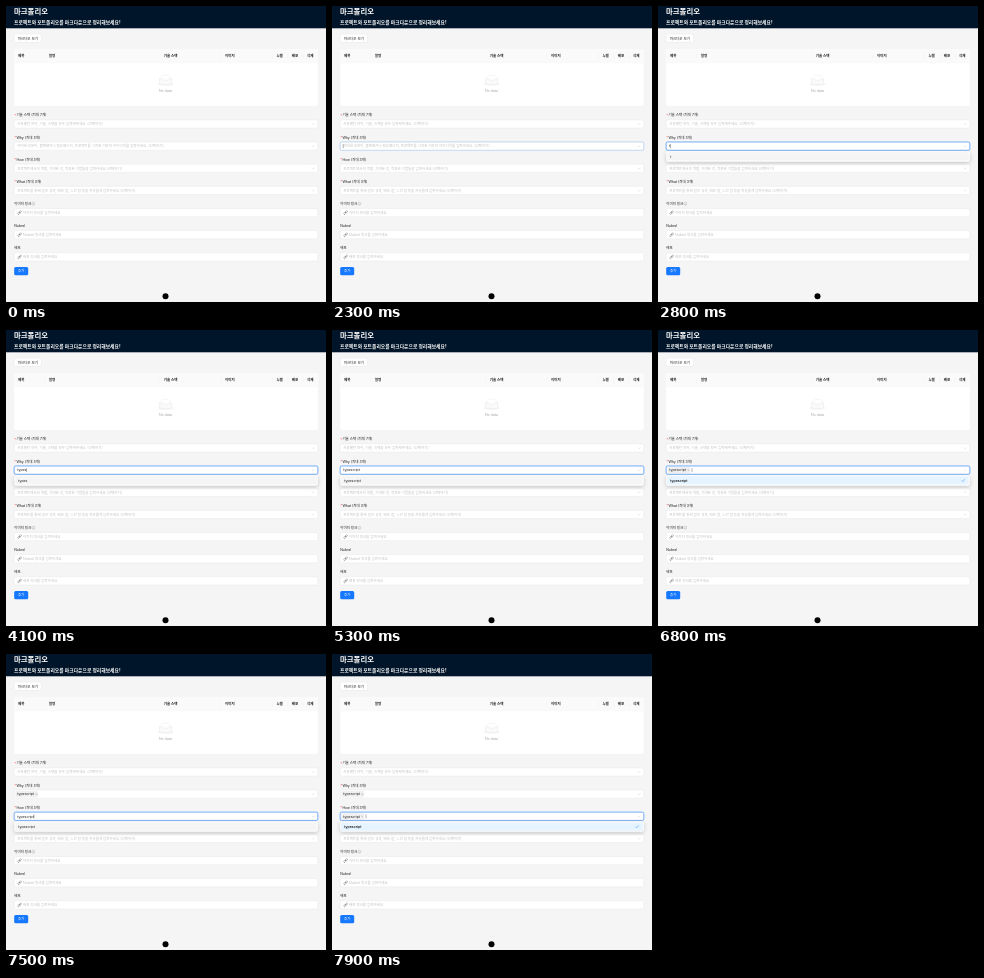
Recreate the animation shown at these times as an HTML page with a canvas. Size 320 by 296 pixels, loop 8 s.

```html
<!DOCTYPE html>
<html lang="ko">
<head>
<meta charset="utf-8">
<style>
  html, body { margin: 0; width: 100%; height: 100%; overflow: hidden; background: #f5f5f5; }
  canvas { display: block; width: 320px; height: 296px; }
</style>
</head>
<body>
<canvas></canvas>
<script>
const LOOP = 8000, LEFT = 8.2, RIGHT = 311.8, HEIGHT = 8.24, UNIT = 0.2576;
const INK = 'rgba(0,0,0,.88)', FAINT = 'rgba(0,0,0,.25)', BLUE = '#1677ff';
const FAMILY = 'Inter, "Noto Sans CJK KR", "Noto Sans CJK", sans-serif';
const WORD = 'typescript';
const KEY_TIMES = [2800, 3300, 3500, 4000, 4100, 4300, 4500, 4600, 4700, 4800];

const canvas = document.querySelector('canvas');
const ctx = canvas.getContext('2d');
const dpr = window.devicePixelRatio || 1;
canvas.width = 320 * dpr;
canvas.height = 296 * dpr;

const ramp = (t, from, to) => Math.min(1, Math.max(0, (t - from) / (to - from)));

function text(str, x, y, { size = 3.5, weight = 400, color = INK, align = 'left' } = {}) {
  ctx.font = `${weight} ${size}px ${FAMILY}`;
  ctx.fillStyle = color;
  ctx.textAlign = align;
  ctx.textBaseline = 'alphabetic';
  ctx.fillText(str, x, y + size * 0.36);
}

function box(x, y, w, h, r, fill, stroke, width = 0.26) {
  ctx.beginPath();
  ctx.roundRect(x, y, w, h, r);
  if (fill) { ctx.fillStyle = fill; ctx.fill(); }
  if (stroke) { ctx.strokeStyle = stroke; ctx.lineWidth = width; ctx.stroke(); }
}

function line(points, color, width = 0.35) {
  ctx.beginPath();
  points.forEach(([x, y]) => ctx.lineTo(x, y));
  ctx.strokeStyle = color;
  ctx.lineWidth = width;
  ctx.stroke();
}

function faded(alpha, draw) {
  ctx.save();
  ctx.globalAlpha = alpha;
  draw();
  ctx.restore();
}

const lid = new Path2D('M55 12.8L44.9 1.3C44.4.5 43.7 0 42.9 0H21.1c-.7 0-1.5.5-2 1.3L9 12.8V22h46z');
const tray = new Path2D('M41.6 15.9c0-1.6 1-2.9 2.2-2.9H55v18.1c0 2.2-1.3 3.9-3 3.9H12c-1.7 0-3-1.7-3-3.9V13h11.2c1.2 0 2.2 1.3 2.2 2.9s1 2.9 2.2 2.9h14.8c1.2 0 2.2-1.3 2.2-2.9z');

function emptyState(top, textY) {
  ctx.save();
  ctx.translate(159.6 - 32 * UNIT, top);
  ctx.scale(UNIT, UNIT);
  ctx.fillStyle = '#f5f5f5';
  ctx.beginPath();
  ctx.ellipse(32, 33, 32, 7, 0, 0, 7);
  ctx.fill();
  ctx.strokeStyle = '#d9d9d9';
  ctx.lineWidth = 1;
  ctx.stroke(lid);
  ctx.fillStyle = '#fafafa';
  ctx.fill(tray);
  ctx.stroke(tray);
  ctx.restore();
  text('No data', 159.6, textY, { color: 'rgba(0,0,0,.35)', align: 'center' });
}

function header() {
  ctx.fillStyle = '#001529';
  ctx.fillRect(0, 0, 320, 22.3);
  text('마크폴리오', 8, 5.5, { size: 7.4, weight: 700, color: '#fff' });
  text('프로젝트와 포트폴리오를 마크다운으로 정리해보세요!', 8, 15.8, { size: 4.8, weight: 700, color: '#fff' });
}

function table() {
  box(LEFT, 28.1, 27.2, HEIGHT, 1.5, '#fff', '#d9d9d9');
  text('마크다운 보기', 21.8, 32.3, { align: 'center' });
  box(LEFT, 43, RIGHT - LEFT, 57, 2, '#fff');
  box(LEFT, 43, RIGHT - LEFT, 13.9, [2, 2, 0, 0], '#fafafa');
  line([[LEFT, 56.9], [RIGHT, 56.9]], '#f0f0f0', 0.26);
  const columns = [['제목', 12], ['설명', 42.8], ['기술 스택', 157.8], ['이미지', 219], ['누렐', 270.4], ['배포', 285.8], ['삭제', 301]];
  columns.forEach(([name, x], i) => {
    text(name, x, 50, { weight: 600 });
    if (i) line([[x - 4, 47], [x - 4, 53]], '#e6e6e6', 0.26);
  });
  emptyState(69.4, 84.5);
}

const selects = [
  ['기술 스택 (최대 7개)', '사용했던 언어, 기술, 스택을 모두 입력해주세요. (선택하기)'],
  ['Why (최대 3개)', '어떠한 부분이, 불편했거나 필요했는지, 프로젝트를 시작한 이유와 아이디어를 입력하세요. (선택하기)'],
  ['How (최대 3개)', '프로젝트에서의 역할, 기여한 것, 적용한 기법들을 입력하세요 (선택하기)'],
  ['What (최대 3개)', '프로젝트를 통해 얻은 성과, 배운 점, 느낀 점 등을 자유롭게 입력하세요 (선택하기)']
];
const links = ['이미지 링크', 'Nubrel', '배포'];
const centerOf = row => 118 + 22.15 * row;

function inputBox(y, focus = 0) {
  const top = y - HEIGHT / 2, width = RIGHT - LEFT;
  box(LEFT, top, width, HEIGHT, 1.5, '#fff', '#d9d9d9');
  if (!focus) return;
  faded(focus, () => {
    box(LEFT - 0.2, top - 0.2, width + 0.4, HEIGHT + 0.4, 1.7, null, 'rgba(5,145,255,.15)', 0.9);
    box(LEFT, top, width, HEIGHT, 1.5, null, BLUE, 0.45);
  });
}

function select(row, { focus = 0, typed = '', tagged = false, caret = false } = {}) {
  const [label, hint] = selects[row], y = centerOf(row);
  text('*', 8.2, y - 8.7, { color: '#ff4d4f' });
  text(label, 10.4, y - 8.9);
  inputBox(y, focus);
  let caretX = 11.2;
  if (tagged) {
    box(9.3, y - 3.1, 22.8, 6.2, 1, 'rgba(0,0,0,.06)');
    text(WORD, 11.3, y);
    line([[29.6, y - 0.8], [31.2, y + 0.8]], 'rgba(0,0,0,.45)', 0.3);
    line([[29.6, y + 0.8], [31.2, y - 0.8]], 'rgba(0,0,0,.45)', 0.3);
    caretX = 34;
  } else if (typed) {
    text(typed, 11.2, y);
    caretX += ctx.measureText(typed).width + 0.1;
  } else {
    text(hint, 11.2, y, { color: FAINT });
  }
  if (caret) line([[caretX, y - 2], [caretX, y + 2]], INK, 0.35);
  line([[305.9, y - 0.6], [307.2, y + 0.7], [308.5, y - 0.6]], FAINT);
}

function link(index) {
  const y = centerOf(index + 4), name = links[index];
  text(name, 8.2, y - 8.9);
  if (index === 0) {
    ctx.beginPath();
    ctx.arc(27.3, y - 8.9, 1.5, 0, 7);
    ctx.strokeStyle = 'rgba(0,0,0,.45)';
    ctx.lineWidth = 0.3;
    ctx.stroke();
    line([[27.3, y - 9.2], [27.3, y - 8]], 'rgba(0,0,0,.45)', 0.3);
  }
  inputBox(y);
  ctx.save();
  ctx.translate(13.6, y);
  ctx.rotate(-Math.PI / 4);
  box(-2.3, -0.75, 2.5, 1.5, 0.75, null, 'rgba(0,0,0,.7)', 0.35);
  box(-0.2, -0.75, 2.5, 1.5, 0.75, null, 'rgba(0,0,0,.7)', 0.35);
  ctx.restore();
  text(`${name.replace('이미지 링크', '이미지')} 링크를 입력하세요`, 17, y, { color: FAINT });
}

function dropdown(row, { alpha, typed, tagged }) {
  if (!alpha) return;
  const y = centerOf(row), top = y + 5.2, itemY = top + 5.15;
  faded(alpha, () => {
    ctx.save();
    ctx.shadowColor = 'rgba(0,0,0,.2)';
    ctx.shadowBlur = 4 * dpr;
    ctx.shadowOffsetY = 1.3 * dpr;
    box(LEFT, top, RIGHT - LEFT, typed || tagged ? 10.3 : 24.6, 2, '#fff');
    ctx.restore();
    if (!typed && !tagged) return emptyState(top + 3, top + 17.8);
    box(LEFT + 1, top + 1, RIGHT - LEFT - 2, HEIGHT, 1, tagged ? '#e6f4ff' : '#f5f5f5');
    text(tagged ? WORD : typed, 12.2, itemY, { weight: tagged ? 600 : 400 });
    if (tagged) line([[303.6, itemY], [304.7, itemY + 1.2], [306.8, itemY - 1.4]], BLUE, 0.4);
  });
}

const blink = (t, since) => t >= since && (t - since) % 1000 < 500;

function whyState(t) {
  const typed = WORD.slice(0, KEY_TIMES.filter(k => k <= t).length);
  const lastKey = [2300, ...KEY_TIMES, 6400].filter(k => k <= t).pop();
  return {
    typed,
    tagged: t >= 6400,
    focus: ramp(t, 2220, 2440) * (1 - ramp(t, 7150, 7400)),
    caret: t < 7000 && blink(t, lastKey),
    alpha: ramp(t, 2320, 2500) * (1 - ramp(t, 7210, 7300))
  };
}

function howState(t) {
  const lastKey = [7000, 7500, 7900].filter(k => k <= t).pop();
  return {
    typed: t >= 7500 ? WORD : '',
    tagged: t >= 7850,
    focus: ramp(t, 6960, 7260),
    caret: blink(t, lastKey),
    alpha: ramp(t, 7020, 7200)
  };
}

function draw(t) {
  ctx.setTransform(dpr, 0, 0, dpr, 0, 0);
  ctx.fillStyle = '#f5f5f5';
  ctx.fillRect(0, 0, 320, 296);
  header();
  table();
  const why = whyState(t), how = howState(t);
  [{}, why, how, {}].forEach((state, row) => select(row, state));
  links.forEach((_, i) => link(i));
  box(LEFT, 260.9, 14, HEIGHT, 1.5, BLUE);
  text('추가', 15.2, 265, { color: '#fff', align: 'center' });
  ctx.beginPath();
  ctx.arc(159.5, 290.3, 3, 0, 7);
  ctx.fillStyle = '#000';
  ctx.fill();
  dropdown(1, why);
  dropdown(2, how);
}

function tick() {
  draw(performance.now() % LOOP);
  requestAnimationFrame(tick);
}
tick();
</script>
</body>
</html>
```
